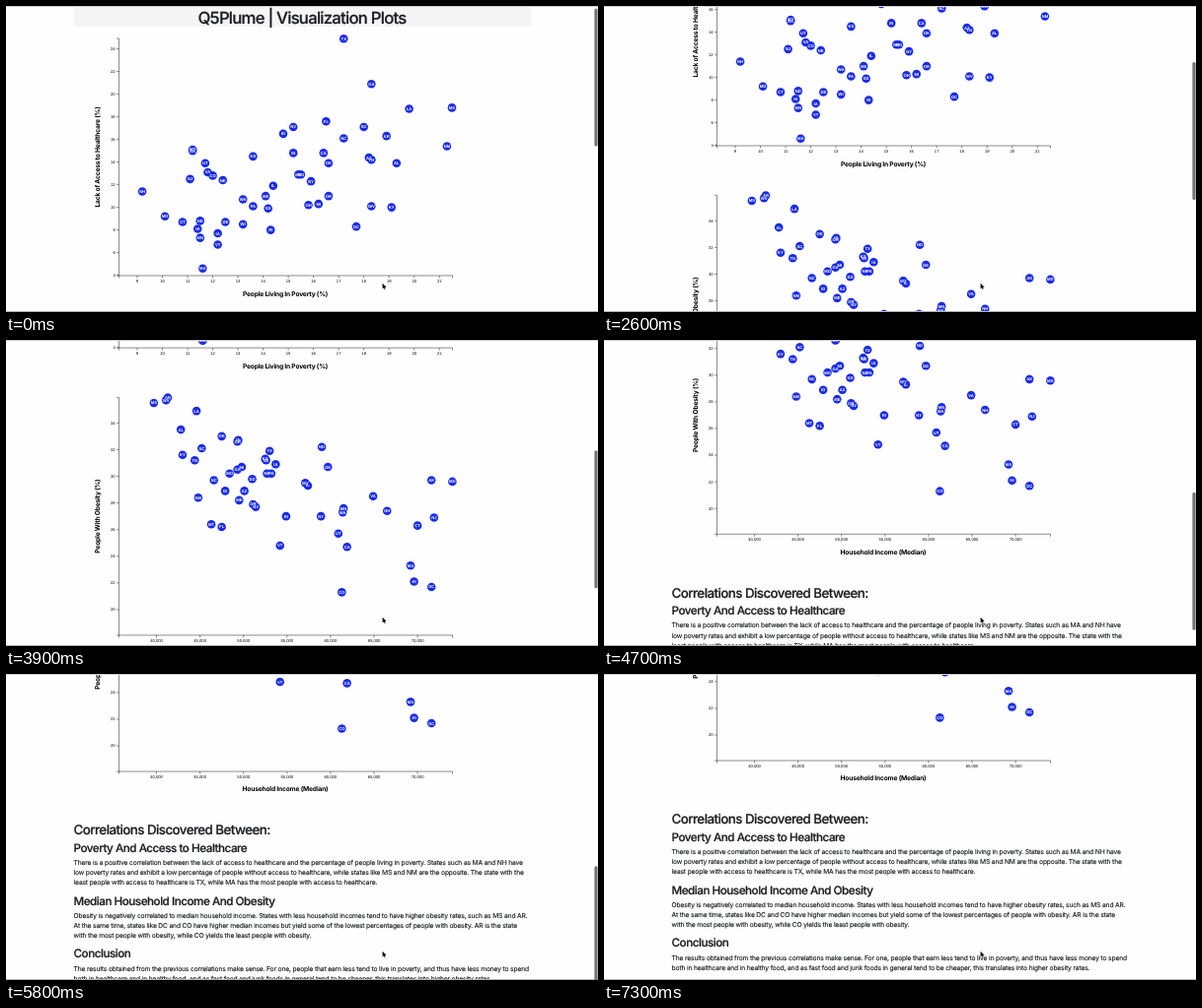
An HTML page that plays this animation: 600 by 311 pixels, repeating every 8.3 s.

```html
<!DOCTYPE html>
<html lang="en">
<head>
<meta charset="utf-8">
<title>Visualization Plots</title>
<style>
  html, body { margin: 0; width: 100%; height: 100%; overflow: hidden; background: #fefefe; }
  svg { display: block; width: 600px; height: 311px; }
  text { font-family: Inter, "Open Sans", sans-serif; fill: #1b1e21; text-rendering: geometricPrecision; white-space: pre; }
  .h1, .h2, .h3 { font-weight: 500; letter-spacing: -.042em; stroke: #1b1e21; stroke-width: .22; }
  .h1 { font-size: 16.73px; letter-spacing: -.046em; text-anchor: middle; }
  .h2 { font-size: 13.37px; }
  .h3 { font-size: 11.7px; }
  .body { font-size: 6.69px; letter-spacing: -.0223em; stroke: #1b1e21; stroke-width: .14; }
  .label { font-size: 6.69px; font-weight: 700; letter-spacing: -.031em; text-anchor: middle; fill: #000; }
  .tick { font: 4.18px "Liberation Sans", sans-serif; fill: #000; }
  .state { font: bold 4.2px "Liberation Sans", sans-serif; fill: #fff; text-anchor: middle; }
  .axis { fill: none; stroke: #000; stroke-width: .45; }
  circle { fill: #1a2be8; }
</style>
</head>
<body>
<svg viewBox="0 0 600 311">
  <g id="page"></g>
  <path d="M0 .5H600" stroke="#d9d9d9"/>
  <path d="M0 310.5H600" stroke="#b8b8b8"/>
  <rect id="thumb" x="596.4" y="2.5" width="3.2" height="140" rx="1.6" fill="#727272"/>
  <path d="M381.6 281.8v5.6l1.3-1.2.9 2 .9-.4-.9-1.9h1.8z" stroke="#fff" stroke-width=".9" paint-order="stroke"/>
</svg>
<script>
const LEFT = 114.5, RIGHT = 452.5, TICK = 2.5, RADIUS = 4.3;

// state, poverty %, lack of healthcare %
const healthcare = `AL 19.3 13.9,AK 11.2 15,AZ 18.2 14.4,AR 18.9 16.3,CA 16.4 14.8,CO 12 12.8,CT 10.8 8.7,
DE 12.5 8.7,DC 17.7 8.3,FL 16.5 17.6,GA 18.3 20.9,HI 11.4 8.1,ID 14.8 16.5,IL 14.4 11.9,IN 15.2 14.8,
IA 12.2 7.7,KS 13.6 14.5,KY 19.1 10,LA 19.8 18.7,ME 14.1 11,MD 10.1 9.2,MA 11.6 4.6,MI 16.2 10.3,
MN 11.5 7.3,MS 21.5 18.8,MO 15.5 12.9,MT 15.4 12.9,NE 12.4 12.4,NV 15.2 17.1,NH 9.2 11.4,NJ 11.1 12.5,
NM 21.3 15.4,NY 15.9 12.3,NC 17.2 16.1,ND 11.5 8.8,OH 15.8 10.2,OK 16.6 13.9,OR 16.6 11,PA 13.6 10.1,
RI 14.3 8,SC 18 17.1,SD 14.2 9.9,TN 18.3 14.2,TX 17.2 24.9,UT 11.7 13.9,VT 12.2 6.7,VA 11.8 13.1,
WA 13.2 10.7,WV 18.3 10.1,WI 13.2 8.5,WY 11.2 15.1`;

// state, income in thousands, obesity %
const obesity = `AL 42.8 33.5,AK 71.6 29.7,AZ 50.1 28.9,AR 41.3 35.9,CA 61.9 24.7,CO 61.3 21.3,CT 70 26.3,
DE 59.7 30.7,DC 71.6 21.7,FL 47.5 26.2,GA 49.3 30.5,HI 69.6 22.1,ID 47.9 28.9,IL 57.4 29.3,IN 49.4 32.7,
IA 53.7 30.9,KS 52.5 31.3,KY 43 31.6,LA 44.6 34.9,ME 49.5 28.2,MD 74 29.6,MA 69.2 23.3,MI 49.8 30.7,
MN 61.5 27.6,MS 39.7 35.5,MO 48.4 30.2,MT 46.3 26.4,NE 52.7 30.2,NV 51.4 27.7,NH 66.5 27.4,NJ 71.9 26.9,
NM 44.8 28.4,NY 58.9 27,NC 46.6 29.7,ND 59 32.2,OH 49.3 32.6,OK 47.5 33,OR 51.1 27.9,PA 53.2 30.2,
RI 54.9 27,SC 45.2 32.1,SD 51 29.8,TN 44.4 31.2,TX 53 31.9,UT 60.9 25.7,VT 54.2 24.8,VA 64.9 28.5,
WA 61.4 27.3,WV 41.1 35.7,WI 52.6 31.2,WY 57.1 29.5`;

const text = (cls, x, y, str, extra = '') => `<text class="${cls}" x="${x}" y="${y}" ${extra}>${str}</text>`;
const lines = (y, ...rows) => rows.map((row, i) => text('body', 68.6, y + i * 10.03, row)).join('');
const range = (from, to, step) => Array.from({ length: (to - from) / step + 1 }, (_, i) => from + i * step);

function chart({ top, bottom, x, y, xTicks, yTicks, format, xLabel, yLabel, labelY, data }) {
  const points = data.split(',').map(row => {
    const [state, px, py] = row.trim().split(' ');
    return { state, cx: x(+px), cy: y(+py) };
  });
  const mid = (top + bottom) / 2;
  let frame = `M${LEFT - TICK} ${top}H${LEFT}V${bottom}h${-TICK}M${LEFT} ${bottom + TICK}v${-TICK}H${RIGHT}v${TICK}`;
  let out = '';
  for (const v of xTicks) {
    frame += `M${x(v)} ${bottom}v${TICK}`;
    out += text('tick', x(v), bottom + 6.9, format(v), 'text-anchor="middle"');
  }
  for (const v of yTicks) {
    frame += `M${LEFT} ${y(v)}h${-TICK}`;
    out += text('tick', LEFT - 3.8, y(v) + 1.4, v, 'text-anchor="end"');
  }
  return out + `<path class="axis" d="${frame}"/>`
    + points.map(p => `<circle cx="${p.cx}" cy="${p.cy}" r="${RADIUS}"/>`).join('')
    + points.map(p => text('state', p.cx, p.cy + 1.5, p.state)).join('')
    + text('label', 283, labelY, xLabel)
    + text('label', 0, 0, yLabel, `transform="translate(94.5 ${mid}) rotate(-90)"`);
}

document.getElementById('page').innerHTML =
  '<rect x="68.5" y="0" width="463.5" height="21" fill="#f4f5f7"/>'
  + text('h1', 300, 17.7, 'Q5Plume | Visualization Plots')
  + chart({
    top: 33, bottom: 274, labelY: 295.3, data: healthcare,
    x: v => 133 + (v - 9) * 25.52, y: v => 273.6 - (v - 4) * 11.5,
    xTicks: range(9, 21, 1), yTicks: range(4, 24, 2), format: v => v,
    xLabel: 'People Living In Poverty (%)', yLabel: 'Lack of Access to Healthcare (%)'
  })
  + chart({
    top: 324.3, bottom: 566, labelY: 586.3, data: obesity,
    x: v => 152.5 + (v - 40) * 8.82, y: v => 540 - (v - 20) * 13.55,
    xTicks: range(40, 70, 5), yTicks: range(20, 34, 2), format: v => v + ',000',
    xLabel: 'Household Income (Median)', yLabel: 'People With Obesity (%)'
  })
  + text('h2', 68.5, 630.3, 'Correlations Discovered Between:')
  + text('h3', 68.5, 648, 'Poverty And Access to Healthcare')
  + lines(661.2,
    'There is a positive correlation between the lack of access to healthcare and the percentage of people living in poverty. States such as MA and NH have',
    'low poverty rates and exhibit a low percentage of people without access to healthcare, while states like MS and NM are the opposite. The state with the',
    'least people with access to healthcare is TX, while MA has the most people with access to healthcare.')
  + text('h3', 68.5, 701.6, 'Median Household Income And Obesity')
  + lines(714.9,
    'Obesity is negatively correlated to median household income. States with less household incomes tend to have higher obesity rates, such as MS and AR.',
    'At the same time, states like DC and CO have higher median incomes but yield some of the lowest percentages of people with obesity. AR is the state',
    'with the most people with obesity, while CO yields the least people with obesity.')
  + text('h3', 68.5, 755.3, 'Conclusion')
  + lines(768.6,
    'The results obtained from the previous correlations make sense. For one, people that earn less tend to live in poverty, and thus have less money to spend',
    'both in healthcare and in healthy food, and as fast food and junk foods in general tend to be cheaper, this translates into higher obesity rates.');

// Scroll gestures: start (ms), number of steps, resting offset
const LOOP = 8300, STEP = 100;
const gestures = [
  [1000, 7, 66], [2000, 7, 132], [3100, 9, 266], [4000, 9, 370],
  [4900, 9, 459.6], [5800, 5, 480], [6300, 2, 478]
];

function scrollAt(time) {
  let offset = 0;
  for (const [start, steps, target] of gestures) {
    if (time < start) break;
    const p = Math.min(1, (Math.floor((time - start) / STEP) + 1) / steps);
    offset += (target - offset) * (1 - (1 - p) ** 2);
  }
  return offset;
}

const page = document.getElementById('page');
const thumb = document.getElementById('thumb');
const began = performance.now();

function draw() {
  const time = (performance.now() - began) % LOOP;
  const offset = scrollAt(time);
  const faded = Math.floor((time - 7000) / STEP) / 3;
  page.setAttribute('transform', `translate(0 ${-offset})`);
  thumb.setAttribute('y', 2.5 + offset * .413);
  thumb.setAttribute('opacity', 1 - Math.min(1, Math.max(0, faded)));
  requestAnimationFrame(draw);
}
draw();
</script>
</body>
</html>
```
